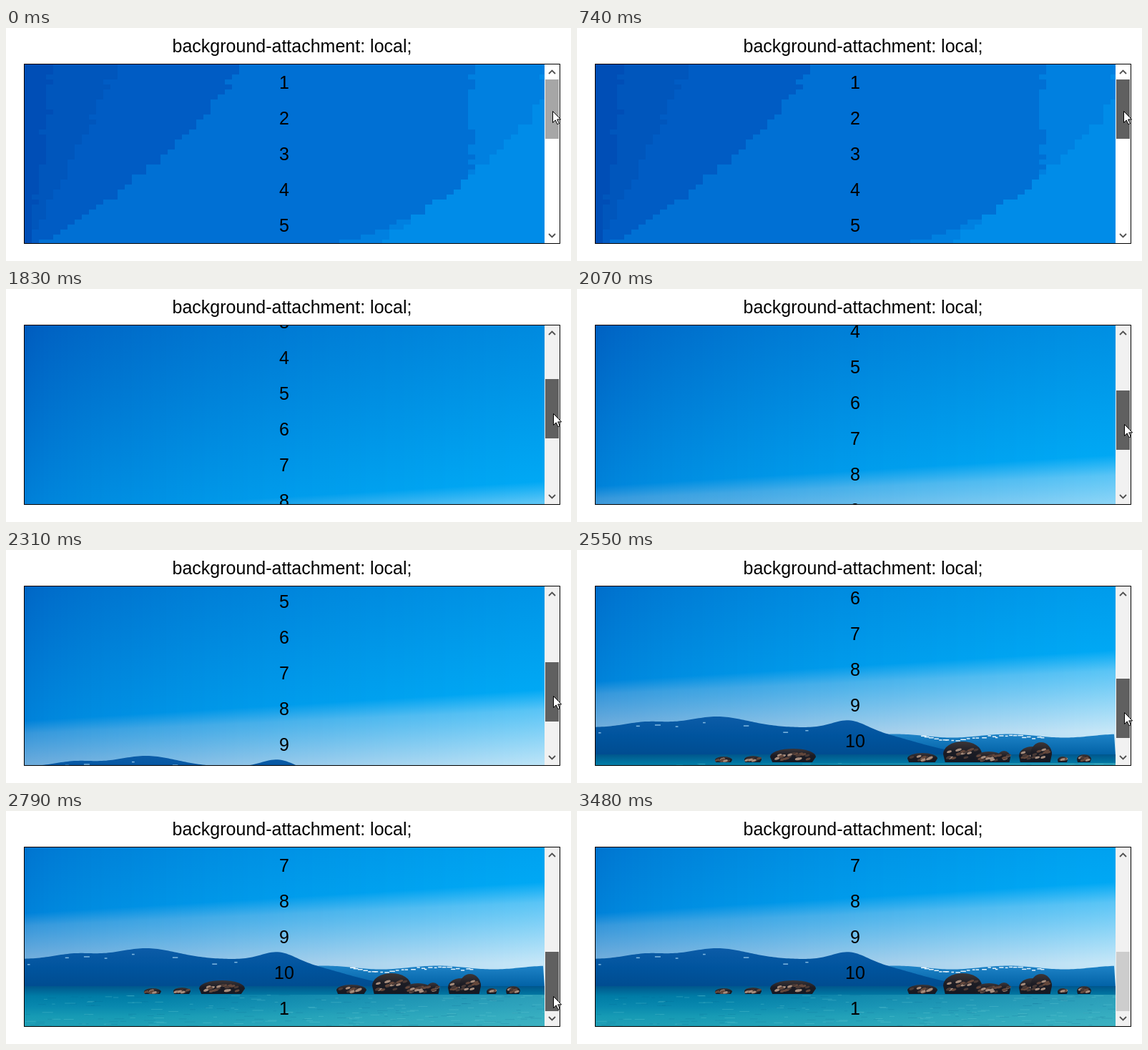
These frames come from a looping animation (790 by 326 pixels, 3.6 s). An HTML page with a canvas:

```html
<!DOCTYPE html>
<html lang="en">
<head>
<meta charset="utf-8">
<title>background-attachment: local</title>
<style>
  html, body { margin: 0; width: 100%; height: 100%; overflow: hidden; background: #fff; }
  body { position: relative; font: 25px/50px "Liberation Sans", Arial, sans-serif; color: #000; }
  #title { position: absolute; left: 0; top: 0; width: 800px; text-align: center; white-space: nowrap; }
  #box { position: absolute; left: 25px; top: 50px; width: 748px; height: 250px; border: 1px solid #000; overflow: hidden; }
  #content { position: absolute; left: 0; top: 0; width: 727px; height: 550px; }
  #content canvas { position: absolute; left: 0; top: 0; }
  #lines { position: relative; width: 726px; text-align: center; }
  #overlay { position: absolute; left: 0; top: 0; }
</style>
</head>
<body>
<div id="title">background-attachment: local;</div>
<div id="box">
  <div id="content">
    <canvas id="photo" width="727" height="550"></canvas>
    <canvas id="flatSky" width="727" height="550"></canvas>
    <div id="lines"></div>
  </div>
</div>
<svg id="overlay" width="790" height="326">
  <rect id="track" x="753" y="51" width="21" height="250"/>
  <rect id="thumb" x="754" width="19" height="83"/>
  <path d="M759 64l4.5-4.5 4.5 4.5M759 288l4.5 4.5 4.5-4.5" fill="none" stroke="#505050" stroke-width="1.8"/>
  <path id="cursor" d="M.5.5v16l3.7-3.6 2.7 5.8 2.4-1-2.6-5.8h5z" fill="#fff" stroke="#000"/>
</svg>
<script>
const $ = id => document.getElementById(id);
const LOOP = 3600, TICK = 120, W = 727, H = 550, SHORE = 496;
const PRESS = 740, DRAG = 1240, SCROLL = 1350, RELEASE = 3480;

// Drag key points: time, scroll offset, cursor y
const dragKeys = [
  [DRAG, 0, 124], [1830, 130, 174], [2310, 204, 204],
  [2550, 259, 227], [2790, 300, 259], [3370, 300, 330]
];

const clamp = v => Math.max(0, Math.min(1, v));
const mix = (a, b, t) => a + (b - a) * t;
const mixRgb = (a, b, t) => a.map((v, i) => mix(v, b[i], t));
const rgb = color => `rgb(${color.map(Math.round)})`;
const bump = (x, center, width) => Math.exp(-(((x - center) / width) ** 2));

let seed = 7;
const random = () => (seed = seed * 16807 % 2147483647) / 2147483647;

function verticalFill(g, top, bottom, colors) {
  const fill = g.createLinearGradient(0, top, 0, bottom);
  colors.forEach((c, i) => fill.addColorStop(i / (colors.length - 1), c));
  return fill;
}

// Blue brightens to the lower right; below it a slanted haze lies over the mountains.
function drawSky(g) {
  for (let x = 0; x < W; x += 3) {
    const u = x / W, hazeTop = mix(392, 348, u);
    const blue = y => mixRgb([0, 72, 176], [0, 168, 244], clamp(.5 * u ** .6 + y / 680));
    const haze = mixRgb([120, 176, 220], [200, 232, 248], u);
    const fill = g.createLinearGradient(0, 0, 0, 462);
    fill.addColorStop(0, rgb(blue(0)));
    fill.addColorStop(hazeTop / 462, rgb(blue(hazeTop)));
    fill.addColorStop(mix(hazeTop, 462, .25) / 462, rgb(mixRgb(blue(hazeTop), haze, .45)));
    fill.addColorStop(1, rgb(haze));
    g.fillStyle = fill;
    g.fillRect(x, 0, 3, H);
  }
}

const nearRidge = x => SHORE - 40 / (1 + Math.exp((x - 445) / 35))
  - 7 * bump(x, 70, 40) - 15 * bump(x, 170, 60) - 12.5 * bump(x, 355, 33);
const farRidge = x => SHORE - 28 - 2.5 * Math.cos((x - 577) / 25);

function drawRidge(g, left, ridge, colors) {
  g.fillStyle = verticalFill(g, 440, SHORE, colors);
  g.beginPath();
  g.moveTo(left, SHORE);
  for (let x = left; x <= W; x += 3) g.lineTo(x, ridge(x));
  g.lineTo(W, SHORE);
  g.fill();
}

function drawSnow(g, left, right, gap, ridge, color) {
  g.fillStyle = color;
  for (let x = left; x < right; x += gap * (.5 + random()))
    g.fillRect(x, ridge(x) + 4 * random(), 3 + 5 * random(), 1.5);
}

function drawWater(g) {
  g.fillStyle = verticalFill(g, SHORE - 2, H, ['#00568c', '#007ca6', '#0888ae', '#169ab4', '#20a0b6']);
  g.fillRect(0, SHORE - 2, W, H);
  const glow = g.createLinearGradient(150, SHORE, W, H + 30);
  glow.addColorStop(0, 'rgba(90,195,205,0)');
  glow.addColorStop(1, 'rgba(90,195,205,.5)');
  g.fillStyle = glow;
  g.fillRect(0, SHORE + 10, W, H);
  for (let i = 0; i < 220; i++) {
    g.fillStyle = i % 2 ? 'rgba(120,215,220,.25)' : 'rgba(0,80,130,.15)';
    g.fillRect(random() * W, mix(506, H, random()), 4 + 12 * random(), 1);
  }
}

// A dark dome with lighter stones scattered over its lower part.
function drawRock(g, [x, width, height]) {
  const base = 505, cx = x + width / 2;
  g.fillStyle = verticalFill(g, base - height, base, ['#3c3638', '#1c1c24', '#141822']);
  g.beginPath();
  g.ellipse(cx, base - height * .4, width / 2, height * .6, 0, Math.PI, 0);
  g.lineTo(cx + width * .42, base);
  g.lineTo(cx - width * .45, base);
  g.fill();
  for (let i = 0; i < width / 3; i++) {
    g.fillStyle = ['#64483c', '#a78d7d', '#4a3a36'][i % 3];
    g.beginPath();
    g.ellipse(cx + (random() - .5) * width * .75, base - height * mix(.2, .65, random()), 3.5, 1.6, -.3, 0, 7);
    g.fill();
  }
}

function drawPhoto(g) {
  drawSky(g);
  drawRidge(g, 380, farRidge, ['#60b0e0', '#1c80c4', '#0060a4']);
  drawSnow(g, 455, 625, 6, farRidge, '#e4f2fa');
  drawRidge(g, 0, nearRidge, ['#0c5ca8', '#00549e', '#004c90']);
  drawSnow(g, 4, 300, 40, x => nearRidge(x) + 4, '#80b8e0');
  drawWater(g);
  // x, width, height
  [
    [167, 24, 8], [208, 24, 9], [244, 64, 19], [436, 42, 13], [486, 54, 29],
    [530, 40, 15], [562, 18, 16], [592, 36, 22], [608, 30, 28], [646, 14, 8], [673, 20, 11]
  ].forEach(rock => drawRock(g, rock));
}

// Flat bands with stepped edges.
function drawFlatSky(g) {
  const band = (color, toRight, edge) => {
    g.fillStyle = color;
    for (let y = 0; y < 250; y += 7) {
      const x = Math.round((edge(y) + 10 * (random() - .5)) / 10) * 10;
      g.fillRect(toRight ? x : 0, y, toRight ? W - x : x, 7);
    }
  };
  g.fillStyle = '#0070d4';
  g.fillRect(0, 0, W, H);
  band('#005cc4', false, y => 300 - .55 * y - .0024 * y * y);
  band('#0056bc', false, y => 130 - y / 2);
  band('#004eb6', false, y => 40 - y / 8);
  band('#0080e0', true, y => 625 - .0166 * Math.max(0, y - 140) ** 2);
  band('#008ce8', true, y => 728 - .18 * Math.max(0, y - 35) ** 1.34);
}

drawPhoto($('photo').getContext('2d'));
drawFlatSky($('flatSky').getContext('2d'));
for (let i = 0; i < 11; i++) {
  const line = document.createElement('div');
  line.textContent = i % 10 + 1;
  $('lines').append(line);
}

// Scroll offset and cursor y, held between ticks.
function dragState(t) {
  if (t < DRAG) return [0, 116];
  const held = t < SCROLL ? DRAG : SCROLL + Math.floor((t - SCROLL) / TICK) * TICK;
  const next = dragKeys.findIndex(key => key[0] > held);
  if (next < 0) return dragKeys[dragKeys.length - 1].slice(1);
  const a = dragKeys[next - 1], b = dragKeys[next];
  const u = (held - a[0]) / (b[0] - a[0]);
  return [1, 2].map(i => Math.round(mix(a[i], b[i], u)));
}

const start = performance.now();

function render(now) {
  const t = Math.max(0, now - start) % LOOP;
  const [scroll, cursorY] = dragState(t);
  const scrolling = t >= SCROLL;
  $('content').style.top = -scroll + 'px';
  $('flatSky').style.visibility = scrolling ? 'hidden' : 'visible';
  $('track').setAttribute('fill', scrolling ? '#f1f1f1' : '#fff');
  $('thumb').setAttribute('y', Math.round(72 + scroll * 125 / 300));
  $('thumb').setAttribute('fill', t < PRESS ? '#a6a6a6' : t < RELEASE ? '#606060' : '#cdcdcd');
  $('cursor').setAttribute('transform', `translate(${scrolling ? 765 : 764} ${cursorY})`);
  requestAnimationFrame(render);
}
render(start);
</script>
</body>
</html>
```
